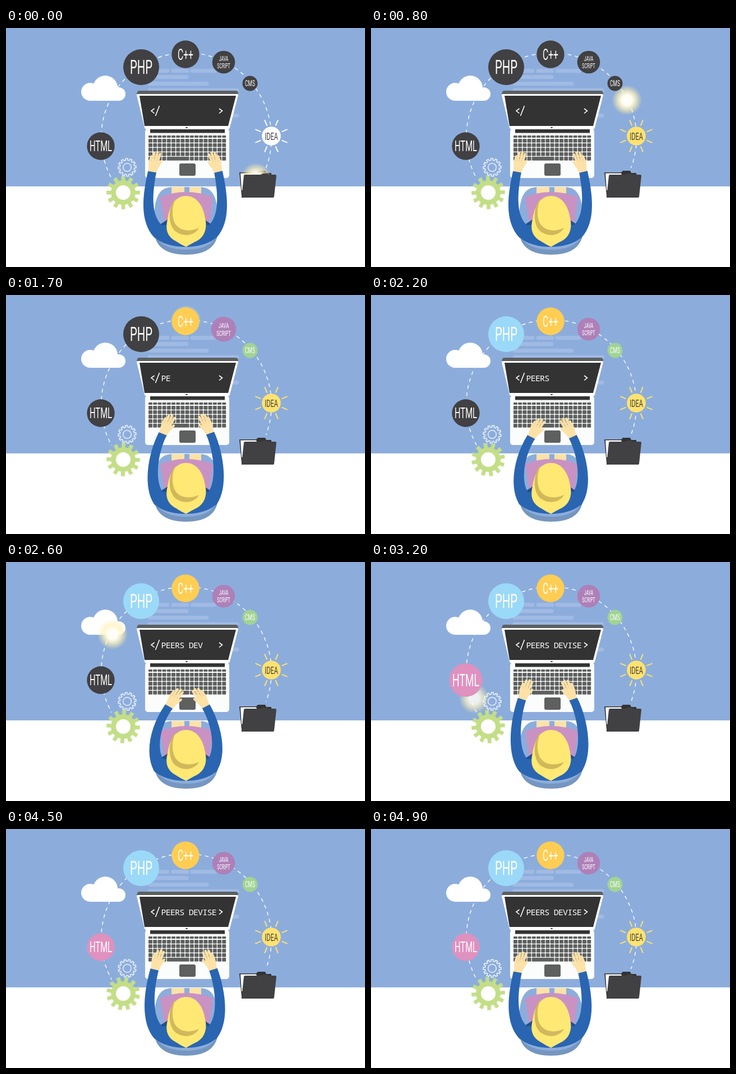
Animation of 640x427 px, one loop 5000 ms. Source, as an HTML page:

```html
<!DOCTYPE html>
<html lang="en">
<head>
<meta charset="utf-8">
<title>Coding desk</title>
<style>
  html, body { margin: 0; width: 100%; height: 100%; overflow: hidden; background: #fff; }
  svg { display: block; width: 100vw; height: 100vh; }
  .label { font-family: Roboto, "Open Sans", sans-serif; font-weight: 400; text-anchor: middle; }
  .code { font-family: "Noto Sans Mono", "DejaVu Sans Mono", monospace; font-size: 15px; letter-spacing: -.8px; fill: #fff; white-space: pre; }
  .turn { animation: turn 5s steps(50) -10ms infinite; }
  .back { animation-direction: reverse; }
  .trail { fill: none; stroke: #fff; stroke-width: 1.4; stroke-dasharray: 6.5 6.5; animation: march 5s steps(50) -10ms infinite; }
  @keyframes turn { to { transform: rotate(180deg); } }
  @keyframes march { to { stroke-dashoffset: -65px; } }
</style>
</head>
<body>
<svg viewBox="0 0 640 427" preserveAspectRatio="none">
  <defs>
    <radialGradient id="shine">
      <stop offset="0" stop-color="#fff"/>
      <stop offset=".35" stop-color="#fffdf0"/>
      <stop offset=".6" stop-color="#fff3c0" stop-opacity=".75"/>
      <stop offset="1" stop-color="#ffe98c" stop-opacity="0"/>
    </radialGradient>
    <g id="hand" fill="#fde2a8">
      <path d="M-6 5L-9-16Q-9-22-5-23L7-23Q11-18 10-12L7 5Z"/>
      <path d="M-7-18L-6-27M-2.5-20L-2-34M2.2-20L3.500-36M6.7-19L8.500-34M8-10L12.500-21" fill="none" stroke="#fde2a8" stroke-width="4.2" stroke-linecap="round"/>
      <path d="M-4.8-18L-4.1-27M-.2-19L.6-33M4.400-19L6-33" fill="none" stroke="#e5c68c" stroke-width=".7"/>
    </g>
  </defs>

  <rect width="640" height="283" fill="#8caddc"/>
  <path d="M256 76.5H288M298 76.5H323M332 76.5H372M256 87.5H322M256 99.5H358M256 111H412M380 156.5H412" stroke="#a0bae4" stroke-width="7" stroke-linecap="round"/>
  <path class="trail" d="M463.400 250A151.800 151.800 0 1 0 188.400 269"/>
  <g fill="#fff">
    <circle cx="150" cy="114" r="16"/><circle cx="177" cy="107" r="22"/><circle cx="201" cy="118" r="12"/>
    <path d="M150 108H201V130H150Z"/>
  </g>

  <path d="M416 258H446L449 255H462L464 259H473V268L466 300H420Z" fill="#333"/>
  <path d="M418 259.500H446L447 262H426L422 290H420Z" fill="#fff"/>
  <circle id="glow" r="27" fill="url(#shine)"/>
  <path d="M427 262H454L458 260H466L467 262H480Q482 262 482 264L478 301Q478 303 476 303H421Q419 303 420 301L424 264Q424 262 427 262Z" fill="#414042"/>
  <g id="topics"></g>

  <g transform="translate(216 249)">
    <g class="turn back" fill="none" stroke="#fff" stroke-width="1.3"><path id="cog"/><circle r="7.3"/></g>
  </g>
  <g transform="translate(209 294)">
    <g class="turn"><path id="gear" fill="#c3de87"/><circle r="13" fill="#fff"/></g>
  </g>

  <path d="M237 112H410Q414 112 414 118H233Q234 112 237 112Z" fill="#5d605f"/>
  <path d="M235 118H412Q414 118 414 120L399 178Q398 181 395 181H251Q248 181 247 178L233 120Q233 118 235 118Z" fill="#fff"/>
  <path d="M238 121H410L396 175H247Z" fill="#333"/>
  <ellipse cx="322" cy="178" rx="2" ry=".9" fill="#333"/>
  <rect x="248" y="180" width="150" height="88" rx="5" fill="#fbfcfc"/>
  <rect x="257" y="181" width="133" height="6.5" fill="#333"/>
  <g id="keys" fill="#5d605f"></g>
  <rect x="309" y="242" width="29" height="22" rx="3" fill="#5d605f"/>
  <path d="M264.500 144L259 148L264.500 152.500M273.500 139L266.500 157M380 144L385.500 148L380 152.500" fill="none" stroke="#fff" stroke-width="1.6"/>
  <text id="typed" class="code" x="276.500" y="154"></text>

  <path d="M264 360C264 394 290 405 321 405S378 394 378 360Z" fill="#7596bf"/>
  <path d="M264 360C262 302 272 284 298 284H345C369 284 380 302 378 360C376 386 350 396 321 396S266 386 264 360Z" fill="#8caddc"/>
  <path d="M295 284H318V297H295ZM327 284H348V297H327Z" fill="#fde2a8"/>
  <path d="M275 302Q298 293 320 293Q346 293 369 302L362 352H283Z" fill="#c992c3"/>
  <path d="M276 350L290 341H352L365 350L355 365H285Z" fill="#1f4f91"/>
  <path d="M263 372C276 386 300 391 320 391S364 386 377 372L360 352H280Z" fill="#2a65b1"/>
  <g id="arms"></g>
  <path d="M321 300C340 300 352 318 355 340C359 356 355 372 341 380Q329 386 321 391Q312 387 303 381C286 372 284 358 288 342C291 318 302 300 321 300Z" fill="#ffe873"/>
  <path d="M303 304C288 318 288 353 303 364C317 374 337 371 344 357C326 366 305 362 299 344C295 330 297 315 303 304Z" fill="#d0b85b"/>
</svg>
<script>
const LOOP = 5000, STEP = 100, DARK = '#414042';
const PHRASE = 'PEERS DEVISE';
const CONDENSE = 0.58;
const $ = id => document.getElementById(id);

function add(parent, tag, attrs, text) {
  const el = document.createElementNS('http://www.w3.org/2000/svg', tag);
  for (const k in attrs) el.setAttribute(k, attrs[k]);
  if (text) el.textContent = text;
  return parent.appendChild(el);
}

// Linear interpolation over rows of [time, ...values].
function track(rows, t) {
  let i = 0;
  while (i < rows.length - 2 && t >= rows[i + 1][0]) i++;
  const [a, b] = [rows[i], rows[i + 1]];
  const k = Math.min(1, Math.max(0, (t - a[0]) / (b[0] - a[0])));
  return a.slice(1).map((v, j) => v + (b[j + 1] - v) * k);
}

function gearPath(n, inner, outer) {
  const pts = [], p = Math.PI * 2 / n;
  for (let i = 0; i < n; i++)
    for (const [o, r] of [[-.29, inner], [-.22, outer], [.22, outer], [.29, inner]]) {
      const a = (i + o) * p - Math.PI / 2;
      pts.push((r * Math.cos(a)).toFixed(2) + ' ' + (r * Math.sin(a)).toFixed(2));
    }
  return 'M' + pts.join('L') + 'Z';
}
$('gear').setAttribute('d', gearPath(12, 22, 30));
$('cog').setAttribute('d', gearPath(12, 12.8, 16));

for (let row = 0; row < 6; row++) {
  const y = row ? 190 + row * 8 : 192;
  for (let col = 0; col < 17; col++) {
    const space = row === 5 && col > 3 && col < 9;
    if (space && col > 4) continue;
    add($('keys'), 'rect', {
      x: 254 + col * 8.2, y, width: space ? 39.8 : 7, height: row ? 6.8 : 4, rx: 1
    });
  }
}

// Each topic lights up at `on`, then swells and settles.
const topics = [
  { x: 241, y: 70, r: 32, on: 2200, lit: '#9bd9f8', lines: [['PHP', 35, 0]] },
  { x: 320, y: 47, r: 24.7, on: 1700, lit: '#ffcd52', lines: [['C++', 27, 0]] },
  { x: 388, y: 61, r: 20.3, on: 1400, lit: '#ae80b8', lines: [['JAVA', 12, -6.5], ['SCRIPT', 12, 7]] },
  { x: 435, y: 99, r: 13.5, on: 1000, lit: '#a1d394', lines: [['CMS', 14.5, 0]] },
  { x: 473, y: 193, r: 16.8, on: 400, lit: '#ffe26f', lines: [['IDEA', 19, 0]], rays: true },
  { x: 169, y: 211, r: 24.7, on: 3000, lit: '#df91bf', lines: [['HTML', 25.5, 0]] }
];
for (const p of topics) {
  p.el = add($('topics'), 'g', {});
  p.off = p.rays ? '#fff' : DARK;
  if (p.rays) {
    p.spokes = add(p.el, 'g', { 'stroke-width': 2 });
    for (let i = 0; i < 8; i++)
      add(p.spokes, 'path', { d: 'M20 0H31', transform: `rotate(${22.5 + i * 45})` });
  }
  add(p.el, 'circle', { r: p.r });
  for (const [text, size, dy] of p.lines)
    add(p.el, 'text', {
      class: 'label', 'font-size': size, y: dy + size * .355,
      fill: p.rays ? DARK : '#fff', transform: `scale(${CONDENSE} 1)`
    }, text);
}

// time, wrist x, wrist y, tilt, outer sleeve x; the right side is mirrored.
const arms = [
  { flip: '', poses: [
    [0, 260.5, 257, 10, 245], [1200, 260.5, 257, 10, 245], [1700, 279.5, 248, 22, 253],
    [2600, 290.5, 258, 30, 257], [3000, 269, 245, 17, 249], [4000, 269, 245, 17, 249], [5000, 260.5, 257, 10, 245]] },
  { flip: 'translate(640) scale(-1 1)', poses: [
    [0, 261.5, 257, 14, 246], [1200, 261.5, 257, 14, 246], [1700, 276, 247, 20, 252],
    [2600, 283.5, 258, 27, 255], [3000, 279.5, 245, 20, 253], [4000, 279.5, 245, 20, 253], [5000, 261.5, 257, 14, 246]] }
];
for (const a of arms) {
  const g = add($('arms'), 'g', { transform: a.flip });
  a.hand = add(g, 'use', { href: '#hand' });
  a.sleeve = add(g, 'path', { fill: '#2a65b1' });
}

function sleevePath(x, y, tilt, outer) {
  const a = tilt * Math.PI / 180, dx = 7.5 * Math.cos(a), dy = 7.5 * Math.sin(a);
  const bow = (mid, from, to) => (mid * 8 - from - to) / 6;
  const o = bow(outer, x - dx, 265), n = bow(outer + 18, x + dx, 283);
  return `M${x - dx} ${y - dy}C${o + 4} ${y + 38} ${o - 4} 345 265 375L290 380L283 356` +
    `C${n - 2} 340 ${n + 2} ${y + 38} ${x + dx} ${y + dy}Z`;
}

// time, angle, radius, opacity around the trail's centre
const flight = [
  [0, -30.6, 145, 1], [800, 25.7, 150, 1], [1700, 90, 149, 1], [2600, 153.7, 146, 1],
  [3200, 200, 146, .85], [3500, 221, 150, 0]
];

function draw(t) {
  const [deg, rad, alpha] = track(flight, t), a = deg * Math.PI / 180;
  const glow = $('glow');
  glow.setAttribute('cx', 321 + rad * Math.cos(a));
  glow.setAttribute('cy', 194 - rad * Math.sin(a));
  glow.setAttribute('opacity', alpha);

  for (const p of topics) {
    const color = t >= p.on ? p.lit : p.off;
    const s = 1 + .2 * Math.max(0, 1 - Math.abs(t - p.on - 200) / 200);
    p.el.setAttribute('transform', `translate(${p.x} ${p.y}) scale(${s})`);
    p.el.setAttribute('fill', color);
    if (p.spokes) p.spokes.setAttribute('stroke', color);
  }

  for (const arm of arms) {
    const [x, y, tilt, outer] = track(arm.poses, t);
    arm.hand.setAttribute('transform', `translate(${x} ${y}) rotate(${tilt})`);
    arm.sleeve.setAttribute('d', sleevePath(x, y, tilt, outer));
  }

  const n = Math.max(0, Math.floor((t - 1460) / 120));
  $('typed').textContent = PHRASE.slice(0, n);
}

let start = null;
function tick(now) {
  if (start === null) start = now;
  draw(Math.floor((now - start + 10) / STEP) * STEP % LOOP);
  requestAnimationFrame(tick);
}
draw(0);
requestAnimationFrame(tick);
</script>
</body>
</html>
```
